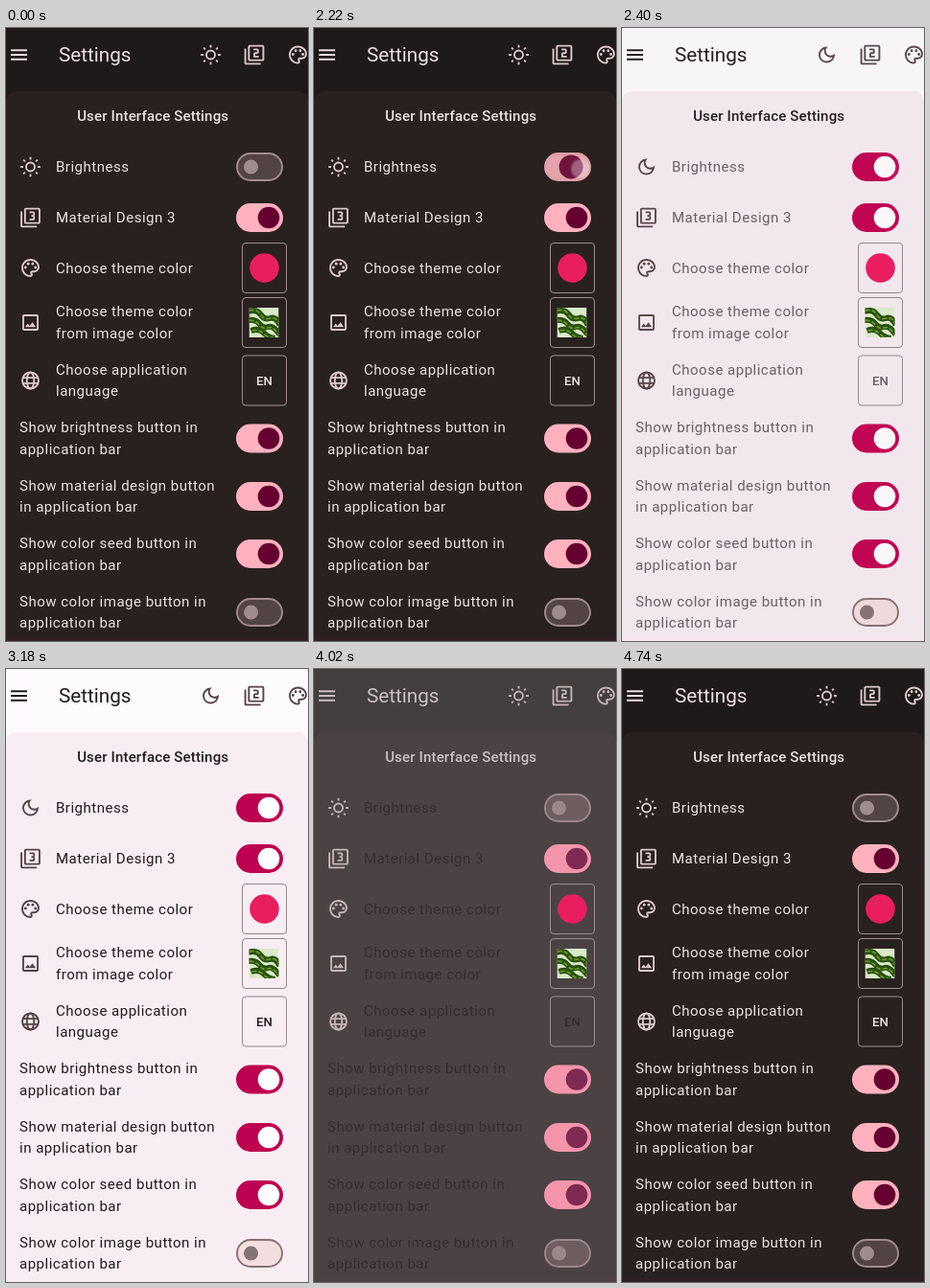
An HTML page that plays this animation: 315x640 px, repeating every 5.1 s.

```html
<!DOCTYPE html>
<html lang="en">
<head>
<meta charset="utf-8">
<title>Settings</title>
<style>
html, body { margin: 0; width: 100%; height: 100%; overflow: hidden; }
svg { display: block; width: 315px; height: 640px; background: var(--bg); }
text { font: 400 15.07px Roboto, sans-serif; letter-spacing: .47px; fill: var(--text); }
.title { font-size: 20.7px; letter-spacing: 0; fill: var(--title); }
.head { font-weight: 500; letter-spacing: .14px; fill: var(--title); }
.code { font-size: 13.2px; font-weight: 500; letter-spacing: .1px; }
.mid { text-anchor: middle; }
.icon { fill: var(--icon); }
.menu { fill: var(--title); }
.line { fill: none; stroke: var(--icon); stroke-width: 2; }
.tile { fill: none; stroke: var(--tile); }
.off { fill: var(--offTrack); stroke: var(--offKnob); stroke-width: 1.9; }
</style>
</head>
<body>
<svg id="stage" viewBox="0 0 315 640" xmlns="http://www.w3.org/2000/svg"></svg>
<script>
const LOOP = 5100;
// The picture only advances at these moments.
const STEPS = [2020, 2120, 2220, 2320, 2400, 2480, 2560,
               3620, 3720, 3830, 3930, 4020, 4110, 4200, 4290];

// [dark, light]
const THEME = {
  bg: ['#1e1a19', '#fefbff'],
  panel: ['#292120', '#f8edf2'],
  strip: ['#2e2022', '#f8edf2'],
  title: ['#ece0e0', '#201a1b'],
  icon: ['#dccaca', '#524346'],
  tile: ['#9f8c8e', '#94878b'],
  onTrack: ['#ffb2be', '#be0050'],
  onKnob: ['#650030', '#ffffff'],
  offTrack: ['#524345', '#f3dedf'],
  offKnob: ['#9f8c8e', '#857374']
};
const TEXT = ['#ece0e0', '#231a1c'];

const FRAME = 'M21 1H7c-1.1 0-2 .9-2 2v14c0 1.1.9 2 2 2h14c1.1 0 2-.9 2-2V3c0-1.1-.9-2-2-2z' +
  'm0 16H7V3h14v14zM3 5H1v16c0 1.1.9 2 2 2h16v-2H3V5z';
const path = d => `<path d="${d}"/>`;
const dot = (x, y) => `<circle cx="${x}" cy="${y}" r="1.5"/>`;
const ICONS = {
  menu: path('M3 18h18v-2H3v2zm0-5h18v-2H3v2zm0-7v2h18V6H3z'),
  two: path(FRAME + 'M17 13h-4v-2h2c1.1 0 2-.89 2-2V7c0-1.11-.9-2-2-2h-4v2h4v2h-2c-1.1 0-2 .89-2 2v4h6v-2z'),
  three: path(FRAME + 'M17 13v-1.5c0-.83-.67-1.5-1.5-1.5.83 0 1.5-.67 1.5-1.5V7c0-1.11-.9-2-2-2h-4v2h4v2h-2v2h2v2h-4v2h4c1.1 0 2-.89 2-2z'),
  palette: path('M12 22C6.49 22 2 17.51 2 12S6.49 2 12 2s10 4.04 10 9c0 3.31-2.69 6-6 6h-1.77c-.28 0-.5.22-.5.5 0 .12.05.23.13.33.41.47.64 1.06.64 1.67A2.5 2.5 0 0 1 12 22z' +
    'm0-18c-4.41 0-8 3.59-8 8s3.59 8 8 8c.28 0 .5-.22.5-.5a.54.54 0 0 0-.14-.35c-.41-.46-.63-1.05-.63-1.65a2.5 2.5 0 0 1 2.5-2.5H16c2.21 0 4-1.79 4-4 0-3.86-3.59-7-8-7z') +
    dot(6.5, 11.5) + dot(9.5, 7.5) + dot(14.5, 7.5) + dot(17.5, 11.5),
  image: path('M19 5v14H5V5h14m0-2H5c-1.1 0-2 .9-2 2v14c0 1.1.9 2 2 2h14c1.1 0 2-.9 2-2V5c0-1.1-.9-2-2-2zm-4.86 8.86-3 3.87L9 13.14 6 17h12l-3.86-5.14z'),
  globe: `<g class="line"><circle cx="12" cy="12" r="9"/><ellipse cx="12" cy="12" rx="4" ry="9"/><path d="M3.5 9h17M3.5 15h17"/></g>`,
  sun: `<g class="line"><circle cx="12" cy="12" r="4.8"/><path d="M12 1v3M12 20v3M1 12h3M20 12h3M4.2 4.2l1.8 1.8M18 18l1.8 1.8M4.2 19.8l1.8-1.8M18 6l1.8-1.8"/></g>`,
  moon: path('M9.37 5.51A7.35 7.35 0 0 0 9.1 7.5c0 4.08 3.32 7.4 7.4 7.4.68 0 1.35-.09 1.99-.27C17.45 17.19 14.93 19 12 19c-3.86 0-7-3.14-7-7 0-2.93 1.81-5.45 4.37-6.49z' +
    'M12 3a9 9 0 1 0 9 9c0-.46-.04-.92-.1-1.36a5.389 5.389 0 0 1-4.4 2.26 5.403 5.403 0 0 1-3.14-9.8c-.44-.06-.9-.1-1.36-.1z')
};

const icon = (name, x, y, cls = '') =>
  `<g class="icon ${cls || name}" transform="translate(${x} ${y}) scale(.942) translate(-12 -12)">${ICONS[name]}</g>`;
const text = (str, x, y, cls = '') => `<text class="${cls}" x="${x}" y="${y}">${str}</text>`;
const lines = (a, b, x, y) => text(a, x, y) + text(b, x, y + 22.6);
const tile = y => `<rect class="tile" x="246.5" y="${y}" width="46" height="52" rx="3.5"/>`;
const toggle = (y, on) => on
  ? `<rect x="240" y="${y - 15}" width="49" height="30" rx="15" fill="var(--onTrack)"/>
     <circle cx="274" cy="${y}" r="11.3" fill="var(--onKnob)"/>`
  : `<rect class="off" x="241" y="${y - 14}" width="47" height="28" rx="14"/>
     <circle cx="255.5" cy="${y}" r="7.5" fill="var(--offKnob)"/>`;
const modeIcon = (x, y) => icon('sun', x, y) + icon('moon', x, y);

const thumb = `
  <svg x="253.5" y="292" width="31" height="31" viewBox="0 0 31 31">
    <rect width="31" height="31" fill="#d9ebc9"/>
    <g fill="none" stroke="#29500f" stroke-width="6">
      <path d="M-1 4q9-3 13 3t10 4 10 7"/>
      <path d="M-1 13q8-1 12 4t9 3 12 8"/>
      <path d="M2 24q8-3 13 2t12 6"/>
    </g>
    <g fill="none" stroke="#6a9c24" stroke-width="1.6" stroke-dasharray="5 2">
      <path d="M0 3q9-2 12 4t10 4 9 6"/>
      <path d="M0 13q7 0 11 5t9 3 11 7"/>
      <path d="M3 24q7-2 12 3t11 4"/>
    </g>
  </svg>`;

const stage = document.getElementById('stage');
stage.innerHTML = `
  <defs><radialGradient id="glow">
    <stop offset=".7" stop-color="#f6e9ec"/><stop offset="1" stop-color="#f6e9ec" stop-opacity="0"/>
  </radialGradient></defs>
  ${icon('menu', 13.5, 28)}
  ${text('Settings', 55, 35, 'title')}
  ${modeIcon(213.5, 28)}${icon('two', 259, 28)}${icon('palette', 304.5, 28)}
  <path d="M0 640V77a11 11 0 0 1 11-11h293a11 11 0 0 1 11 11v563z" fill="var(--panel)"/>
  <rect y="636" width="315" height="4" fill="var(--strip)"/>
  ${text('User Interface Settings', 153.2, 97, 'head mid')}
  ${modeIcon(25.5, 145)}${text('Brightness', 52, 150)}
  ${icon('three', 25.5, 198)}${text('Material Design 3', 52, 203)}${toggle(198, true)}
  ${icon('palette', 25.5, 250.5)}${text('Choose theme color', 52, 256)}
  ${tile(224.5)}<circle cx="269.5" cy="250.5" r="15.3" fill="#e91e5f"/>
  ${icon('image', 25.5, 307.5)}${lines('Choose theme color', 'from image color', 52, 301)}
  ${tile(281.5)}${thumb}
  ${icon('globe', 25.5, 368)}${lines('Choose application', 'language', 52, 361.5)}
  ${tile(342)}${text('EN', 269.5, 373, 'code mid')}
  ${lines('Show brightness button in', 'application bar', 14, 422)}${toggle(428.5, true)}
  ${lines('Show material design button', 'in application bar', 14, 482.5)}${toggle(489, true)}
  ${lines('Show color seed button in', 'application bar', 14, 543)}${toggle(549, true)}
  ${lines('Show color image button in', 'application bar', 14, 603.5)}${toggle(610, false)}
  <rect id="track" x="241" y="131" width="47" height="28" rx="14" stroke-width="2"/>
  <circle id="knob" cy="145"/>
  <circle id="touch" r="11.5" fill="url(#glow)"/>`;

const [track, knob, touch] = ['track', 'knob', 'touch'].map(id => document.getElementById(id));
const suns = stage.querySelectorAll('.sun');
const moons = stage.querySelectorAll('.moon');

const ramp = (t, a, b) => Math.min(1, Math.max(0, (t - a) / (b - a)));
const pulse = (t, a, b, c, d) => ramp(t, a, b) - ramp(t, c, d);
const lerp = (a, b, p) => a + (b - a) * p;
const rgb = hex => [1, 3, 5].map(i => parseInt(hex.slice(i, i + 2), 16));
const mixRgb = (a, b, p) => a.map((v, i) => lerp(v, b[i], p));
const css = c => `rgb(${c.map(Math.round)})`;
const set = (el, attrs) => { for (const k in attrs) el.setAttribute(k, attrs[k]); };

function draw(t) {
  const theme = pulse(t, 2220, 2405, 3868, 4050);
  const label = pulse(t, 2272, 2472, 4002, 4202);
  const on = pulse(t, 2060, 2295, 3670, 3870);
  const press = pulse(t, 2020, 2120, 2320, 2400) + pulse(t, 3580, 3680, 3880, 3990);

  const color = {};
  for (const name in THEME) {
    color[name] = mixRgb(...THEME[name].map(rgb), theme);
    stage.style.setProperty('--' + name, css(color[name]));
  }
  stage.style.setProperty('--text', css(mixRgb(...TEXT.map(rgb), label)));

  suns.forEach(el => el.style.display = theme > .5 ? 'none' : '');
  moons.forEach(el => el.style.display = theme > .5 ? '' : 'none');

  const tint = Math.min(1, on * 1.25);
  const fill = mixRgb(color.offTrack, color.onTrack, tint);
  set(track, { fill: css(fill), stroke: css(mixRgb(color.offKnob, fill, tint)) });
  set(knob, {
    cx: lerp(255.5, 274, on),
    r: lerp(lerp(7.5, 11.3, on), 12.5, press),
    fill: css(mixRgb(color.offKnob, color.onKnob, tint))
  });

  // A finger drags the switch right, later back to the left.
  const back = t > 3000;
  const drag = back ? ramp(t, 3620, 3930) : ramp(t, 2020, 2220);
  set(touch, {
    cx: back ? lerp(276, 220, drag) : lerp(250, 278, drag),
    cy: back ? lerp(146, 155, drag) : lerp(150, 147, drag),
    opacity: back ? .5 * pulse(t, 3570, 3670, 3930, 4020) : .36 * pulse(t, 1970, 2070, 2260, 2430)
  });
}

function tick() {
  const now = performance.now() % LOOP;
  draw(STEPS.reduce((last, s) => s <= now ? s : last, 0));
  requestAnimationFrame(tick);
}
tick();
</script>
</body>
</html>
```
